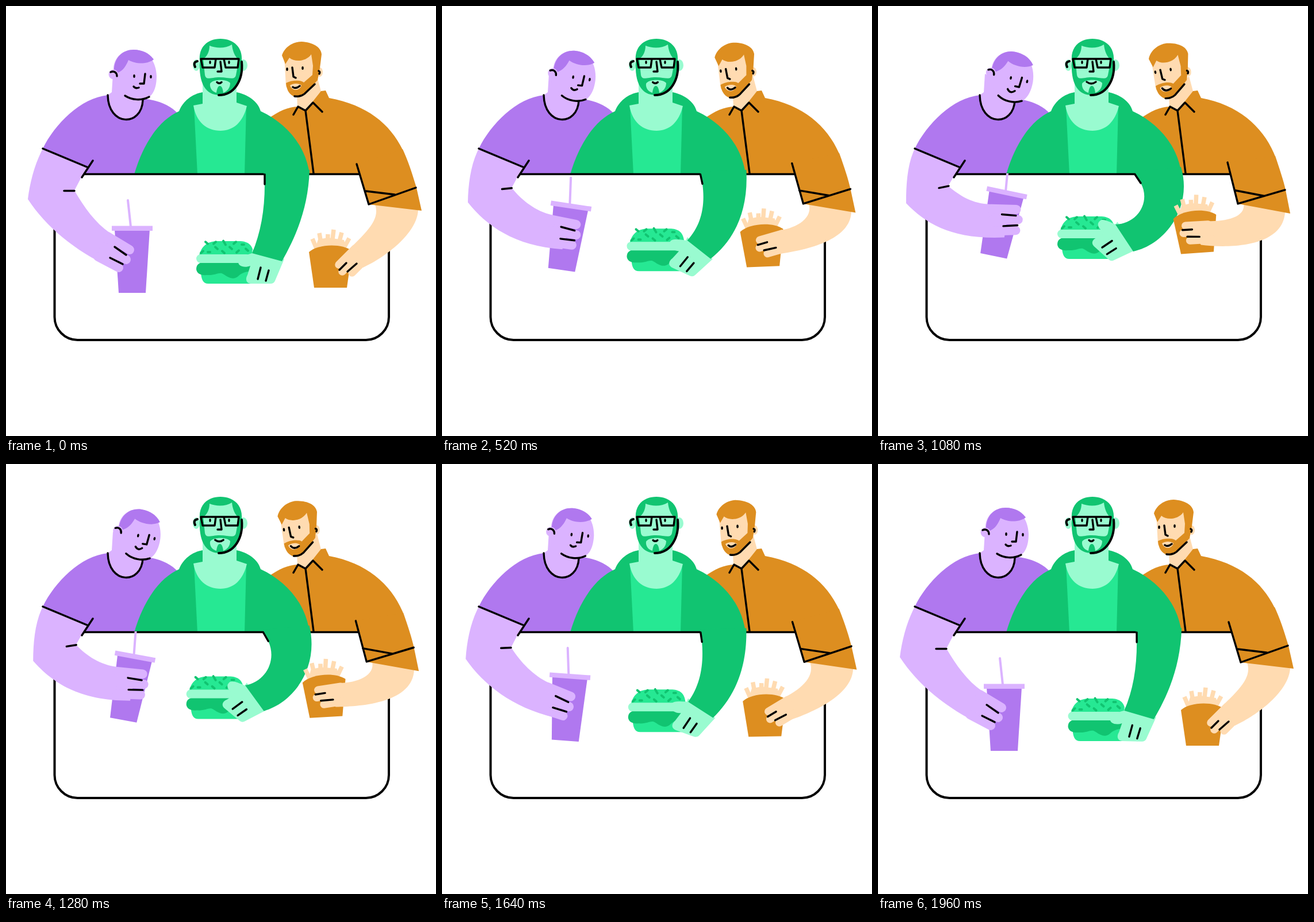
An HTML page for the animation above (2000 ms loop, 748 px wide and 748 px high).

```html
<!DOCTYPE html>
<html lang="en">
<head>
<meta charset="utf-8">
<title>Lunch together</title>
<style>
  html, body { margin: 0; width: 100%; height: 100%; overflow: hidden; background: #fff; }
  svg { display: block; width: 100vw; height: 100vh; }
  .line { fill: none; stroke: #000; stroke-width: 3.4; stroke-linecap: round; stroke-linejoin: round; }
  .thick { stroke-width: 4; }
  .violet { fill: #b078ef; } .lilac { fill: #dbb3ff; }
  .green { fill: #11c471; } .mint { fill: #26e893; } .pale { fill: #99fbd0; }
  .amber { fill: #dd8e20; } .peach { fill: #ffdbb1; }
  .finger { fill: none; stroke-linecap: round; }
</style>
</head>
<body>
<svg viewBox="0 0 748 748" xmlns="http://www.w3.org/2000/svg">
  <defs><clipPath id="belowEdge"><rect y="291" width="748" height="457"/></clipPath></defs>

  <!-- left person -->
  <path class="violet" d="M177 155C130 160 85 205 64 248L143 281L133 293H300V188C285 172 265 164 238 161Z"/>
  <path class="lilac" d="M186 118L184 150L177 155C180 210 235 210 238 164L232 140Z"/>
  <path class="line" d="M177 155C178 210 236 210 238 164"/>
  <g id="leftHead">
    <path class="lilac" d="M187 110C187 90 203 76 222 76C246 76 261 95 262 122C262 142 256 155 246 160C230 164 215 162 206 156L186 135Z"/>
    <path class="violet" d="M188 114C187 90 203 76 222 76C238 76 250 83 257 93C245 102 225 101 213 94C209 104 204 112 195 116Z"/>
    <circle class="lilac" cx="187" cy="119" r="8.5"/>
    <path class="line" d="M182 115C188 112 193 116 193 122M207 156C219 164 236 165 249 158M242 118L240 135L233 135"/>
    <g class="eyes"><ellipse cx="223" cy="122" rx="1.8" ry="3"/><ellipse cx="252" cy="123" rx="1.8" ry="3"/></g>
    <path class="line" id="leftMouth"/>
  </g>

  <!-- right person -->
  <path class="peach" d="M506 155L541 122L549 152L521 184L507 177Z"/>
  <g id="rightHead">
    <path class="peach" d="M484 86L487 140L503 157L520 152L543 125L546 84L515 70Z"/>
    <ellipse class="peach" cx="546" cy="115" rx="5" ry="8"/>
    <path class="amber" d="M480 86C484 72 499 62 514 62C533 63 548 71 549 84L546 108L542 129L520 153C514 158 505 159 500 157C491 152 488 144 487 134C496 129 512 128 518 133L533 120L534 104L531 84C522 97 502 98 493 90L486 101Z"/>
    <path class="peach" d="M494 138C500 134 509 134 514 138C511 148 498 149 494 138Z"/>
    <path class="line" d="M502 157C509 158 514 157 519 153L537 136M498 107L500 123L504 125M544 113Q547 114 545 118"/>
    <g class="eyes"><ellipse cx="489" cy="110" rx="1.8" ry="3"/><ellipse cx="516" cy="108" rx="1.8" ry="3"/></g>
    <path class="line" id="rightMouth"/>
  </g>

  <!-- table -->
  <path d="M84.500 292.500H666V541A40 40 0 0 1 626 581H124.500A40 40 0 0 1 84.500 541Z" fill="#fff"/>
  <path class="amber" id="shirt"/>
  <path class="line" d="M500 189L508 175L521 182L534 168L550 184M521 182L535 291"/>

  <!-- middle person -->
  <path class="green" d="M223 293C240 235 268 198 301 183C308 165 324 153 342 150H401C420 154 438 165 443 183C490 205 522 245 528 293Z"/>
  <path class="mint" d="M327 175L333 293H415L418 174Z"/>
  <path class="pale" d="M326 173L342 170V130H401V168L419 174C412 203 395 217 373 217C350 217 331 203 326 173Z"/>
  <ellipse class="pale" cx="331" cy="103" rx="6" ry="10"/>
  <ellipse class="pale" cx="413" cy="103" rx="7" ry="10"/>
  <path class="green" d="M337 95C335 72 350 57 373 57C396 57 412 72 410 95C412 132 398 155 372 155C347 155 335 135 337 95Z"/>
  <path class="pale" d="M343 92C350 88 354 79 354 69C366 74 382 74 393 67C394 78 398 88 405 94L400 120C398 130 388 124 372 124C356 124 348 130 346 120Z"/>
  <path class="pale" d="M355 135C360 127 384 127 390 134C390 143 384 149 378 151C377 143 375 139 372 139C369 139 367 143 366 151C359 149 354 143 355 135Z"/>
  <path class="line thick" d="M410 97C413 128 398 155 370 155M329 106C326 100 328 97 333 96"/>
  <path class="line" d="M339 92H365L363 107H342ZM379 92H405L403 107H382ZM365 92H379M373 97L375 114H368"/>
  <ellipse cx="355" cy="98" rx="1.700" ry="3"/><ellipse cx="388" cy="98" rx="1.700" ry="3"/>
  <path class="line" id="midMouth"/>

  <path class="line" d="M133 292.500H617"/>
  <path class="line thick" d="M84.500 345V541A40 40 0 0 0 124.500 581H626A40 40 0 0 0 666 541V345"/>

  <!-- drink -->
  <g clip-path="url(#belowEdge)"><g id="cup">
    <path d="M212 338L217 384" stroke="#dbb3ff" stroke-width="4" stroke-linecap="round"/>
    <path class="violet" d="M189 389H250L243 499H196Z"/>
    <rect class="lilac" x="184" y="382.500" width="71" height="8.500"/>
  </g></g>
  <path class="lilac" id="leftArm"/>
  <path class="line" d="M64 248L143 281M151 269L132 298"/>
  <path class="line" id="leftElbow"/>
  <g id="leftHand">
    <path class="finger" stroke="#dbb3ff" stroke-width="16" d="M215 424L177 401M209 441L170 419M196 455L160 436"/>
    <path class="line" d="M189 419L209 433M181 438L203 449"/>
  </g>

  <!-- burger -->
  <g id="burger">
    <path class="mint" d="M336 434C340 418 350 409 368 409H408C421 410 430 415 431 434ZM339 460H432V483H352C343 483 339 476 339 460Z"/>
    <path class="green" d="M331 458C331 449 337 446 344 446H432V462C420 460 410 464 404 470C396 477 388 473 379 467C371 461 366 469 350 468C338 469 332 465 331 458Z"/>
    <rect class="pale" x="331" y="432" width="95" height="15" rx="7.500"/>
    <path id="seeds" fill="none" stroke="#11c471" stroke-width="4" stroke-linecap="round"/>
  </g>
  <g id="midHand">
    <path class="pale" d="M428 424L484 440L468 478Q466 483 460 483H426C416 482 417 473 420 468L425 452C415 456 403 453 404 444C404 437 415 434 428 430Z"/>
    <path class="line" d="M443 455L438 475M457 460L452 478"/>
  </g>
  <path class="green" id="sleeve"/>
  <path class="line" id="midElbow"/>

  <!-- fries -->
  <g id="fries">
    <path class="peach" d="M537 424L543 406L560 403L588 407L592 424Z"/>
    <path d="M533 405L541 424M545 395L550 424M560 397L559 424M570 389L566 424M584 394L576 424M597 404L586 424" stroke="#ffdbb1" stroke-width="7.500"/>
    <path class="amber" d="M527 428C542 414 584 412 602 426L593 490H536Z"/>
  </g>
  <path class="peach" id="rightArm"/>
  <g id="rightHand">
    <path class="finger" stroke="#ffdbb1" stroke-width="13.500" d="M579 450L607 422M585 462L613 434M602 464L630 436"/>
    <path class="line" d="M592 447L580 459M610 448L594 462"/>
  </g>
  <path class="amber" id="cuff"/>
  <path class="line" id="cuffLines"/>
</svg>
<script>
const LOOP = 2000, STEP = 40;
const byId = id => document.getElementById(id);
const clamp = x => Math.min(1, Math.max(0, x));
const ease = x => (1 - Math.cos(Math.PI * clamp(x))) / 2;

// Rise from 0 to `top`, rest, then sink between `leave` and `end`.
const swing = (t, top, leave, end) =>
  t < leave ? ease(t / top) : 1 - ease((t - leave) / (end - leave));

const turn = (x, y, angle, px, py) => `translate(${x} ${y}) rotate(${angle} ${px} ${py})`;

// Quadratic blend of three poses; the middle one sits at progress `mid`.
function blend(p, mid, [low, half, high]) {
  const a = (p - mid) * (p - 1) / mid;
  const b = p * (1 - p) / (mid * (1 - mid));
  const c = p * (p - mid) / (1 - mid);
  const number = /-?\d+(\.\d+)?/g;
  const halves = half.match(number), highs = high.match(number);
  let i = 0;
  return low.replace(number, n => {
    const value = a * n + b * halves[i] + c * highs[i];
    i++;
    return value.toFixed(2);
  });
}

const turns = (px, py, half, high) =>
  [turn(0, 0, 0, px, py), turn(...half, px, py), turn(...high, px, py)];

const sideParts = [
  ['leftHead', 'transform', turns(210, 168, [0, 0, 5.6], [0, 0, 10.5])],
  ['rightHead', 'transform', turns(525, 160, [-0.8, 0.6, -3.2], [-1.6, 1.2, -6])],
  ['leftMouth', 'd', ['M222 140Q225 144 231 142', 'M222 141Q226 146 232 142', 'M221 142Q227 150 234 143']],
  ['rightMouth', 'd', ['M499 141Q504 145 511 139', 'M499 140Q504 146 512 140', 'M498 139Q503 147 513 141']],
  ['cup', 'transform', turns(243, 499, [-10, -31, 7.4], [-19, -60, 11.8])],
  ['leftArm', 'd', [
    'M64 248C50 275 42 305 38 336C70 385 120 425 180 454L200 440L181 395C155 377 136 350 119 321L131 298L143 281Z',
    'M64 248C50 275 45 308 44 341C75 382 125 420 206 428L215 405L190 368C162 360 138 340 121 317L131 298L143 281Z',
    'M64 248C51 275 49 310 49 343C85 380 130 406 220 402L225 370L196 344.5C165 344 142 330 122 313L131 298L143 281Z']],
  ['leftElbow', 'd', ['M101 321.5L119 321.5', 'M104 319L121 317.5', 'M106 316.5L123 313']],
  ['leftHand', 'transform', turns(209, 433, [19, -36, -17], [31, -69, -30])],
  ['fries', 'transform', turns(536, 490, [-5, -30, -2], [-9, -59, -4.2])],
  ['rightArm', 'd', [
    'M641 343C652 368 632 389 602 418L592 440L621 455C660 437 716 395 717 354Z',
    'M638 343C648 368 620 388 591 394L570 420L593 435C640 425 712 405 713 357Z',
    'M636 343C640 368 605 374 573 374L550 395L561 415C610 422 706 420 708 357Z']],
  ['rightHand', 'transform', turns(580, 459, [-26, -37, 25], [-51, -70, 42])],
  ['shirt', 'd', [
    'M455 197C475 182 490 176 508 175L521 182L548 148L556 147L562 160C628 172 668 205 690 250L630 293L455 293Z',
    'M455 197C475 182 490 176 508 175L521 182L548 148L556 147L562 160C628 172 670 208 691 256L630 293L455 293Z',
    'M455 197C475 182 490 176 508 175L521 182L548 148L556 147L562 160C628 172 672 212 691 262L630 293L455 293Z']],
  ['cuff', 'd', [
    'M610 275L690 249C702 275 709 300 714 316L723 356L630 345Z',
    'M609 273L691 255C700 279 707 301 711 318L720 359L628 344Z',
    'M608 272L691 261C699 285 705 303 709 320L717 361L626 344Z']],
  ['cuffLines', 'd', [
    'M610 275L631 345L713 316M626 322L676 328',
    'M609 274L629 344L711 318M622 321L674 329.5',
    'M608 272L626 344L708 320M620 320.5L672 330.5']]
];

const middleParts = [
  ['burger', 'transform', turns(0, 0, [-12, -27.5, 0], [-19, -43, 0])],
  ['midHand', 'transform', turns(438, 475, [-30, -30, 30], [-48, -55, 42])],
  ['sleeve', 'd', [
    'M448 285L450 311C450 355 443 395 428 430L480 444C505 400 526 350 528 285Z',
    'M448 288L454 309C462 345 452 380 424 401L462 437C504 412 537 360 529 284Z',
    'M446 288L457 308C475 340 452 379 413 380L444 427C500 415 548 350 527 280Z']],
  ['midElbow', 'd', ['M450 293L450 310', 'M449 293L454 309', 'M447 293L457 308']],
  ['midMouth', 'd', ['M367 132.5Q371 136.5 375 132.5', 'M366 132.5Q371 136.5 376 132.5', 'M363 132Q371 138 379 132']]
];

byId('seeds').setAttribute('d', [
  [349, 412, 1], [363, 412, -1], [380, 412, 2], [398, 412, -1], [412, 415, 0], [341, 428, -1],
  [353, 428, 0], [366, 421, 1], [378, 428, 1], [391, 421, 1], [403, 427, -1], [419, 424, 1]
].map(([x, y, tilt]) => `M${x - 2} ${y - tilt * 1.7}l4 ${tilt * 3.4}`).join(''));

const eyes = document.querySelectorAll('.eyes ellipse');

function draw(t) {
  const side = swing(t, 900, 1020, 1980);
  const middle = swing(t, 1000, 1110, 2060);
  for (const [id, attr, poses] of sideParts) byId(id).setAttribute(attr, blend(side, 0.53, poses));
  for (const [id, attr, poses] of middleParts) byId(id).setAttribute(attr, blend(middle, 0.66, poses));
  const open = clamp((Math.abs(t - 760) - 40) / 80);
  eyes.forEach(eye => eye.setAttribute('ry', 3 * open));
}

function frame(now) {
  draw(Math.floor((now % LOOP) / STEP) * STEP);
  requestAnimationFrame(frame);
}
draw(0);
requestAnimationFrame(frame);
</script>
</body>
</html>
```
